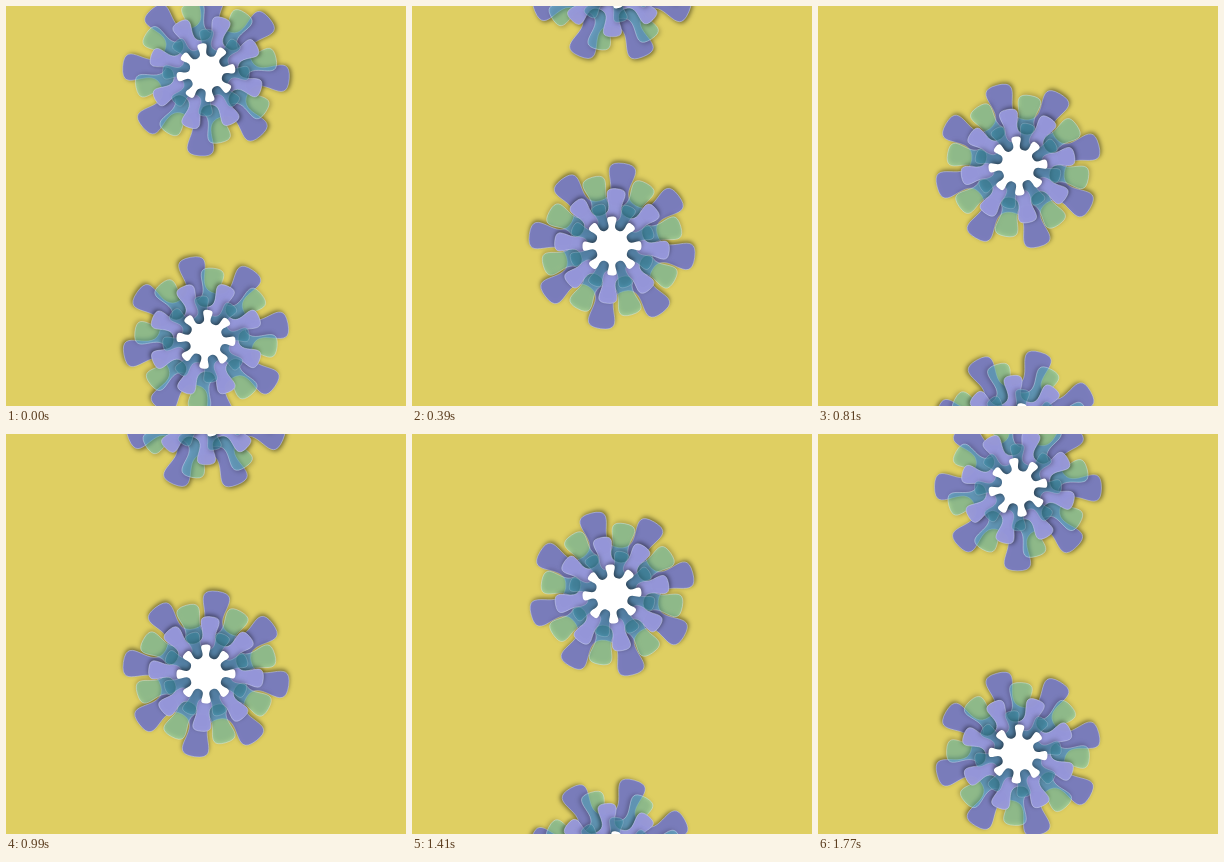
Write an HTML page that moves like this. It is 400 px wide and 400 px high and loops after 1.8 s.

```html
<!DOCTYPE html>
<html lang="en">
<head>
<meta charset="utf-8">
<title>Falling flowers</title>
<style>
  html, body { margin: 0; width: 100%; height: 100%; overflow: hidden; background: #dfcf62; }
  svg { display: block; width: 100vw; height: 100vh; }
</style>
</head>
<body>
<svg id="stage" viewBox="0 0 400 400"></svg>
<script>
const NS = "http://www.w3.org/2000/svg";
const stage = document.getElementById("stage");
const PERIOD = 600, STEP = 30, SPACING = 800 / 3, TOP = 200 / 3;

// start: degrees at time zero; turn: degrees per period
const RINGS = [
  { radius: 83.5, start: 4.2, turn: 75, fill: "#797cbf", alpha: 0.97, edge: 0.45 },
  { radius: 71.5, start: 33.3, turn: 62.5, fill: "#5fd6dc", alpha: 0.42, edge: 0.45 },
  { radius: 57.5, start: 17, turn: 50, fill: "#989add", alpha: 0.96, edge: 0.45 },
  { radius: 43.5, start: 0.8, turn: 37.5, fill: "#3f8fa8", alpha: 0.55, edge: 0.25 },
  { radius: 29.5, start: 36.6, turn: 12.5, fill: "#fff", alpha: 1, edge: 0 }
];
// The shadow swings anticlockwise around each flower, measured from straight up
const SHADOW = { distance: 2, start: 85, turn: -130 };

function add(parent, tag, attrs = {}) {
  const el = document.createElementNS(NS, tag);
  for (const key in attrs) el.setAttribute(key, attrs[key]);
  parent.appendChild(el);
  return el;
}

// Eight-armed star with broad rounded tips and soft valleys
function starPath(radius, arms = 8) {
  const inner = radius * 0.56, tipHandle = radius * 0.38, valleyHandle = radius * 0.32;
  const point = (angle, r, side) =>
    [r * Math.sin(angle) + side * Math.cos(angle),
     -r * Math.cos(angle) + side * Math.sin(angle)].map(v => v.toFixed(2)).join(",");
  let d = "M" + point(0, radius, 0);
  for (let i = 0; i < arms; i++) {
    const tip = i * 2 * Math.PI / arms;
    const valley = tip + Math.PI / arms;
    const next = tip + 2 * Math.PI / arms;
    d += `C${point(tip, radius, tipHandle)} ${point(valley, inner, -valleyHandle)} ${point(valley, inner, 0)}`;
    d += `C${point(valley, inner, valleyHandle)} ${point(next, radius, -tipHandle)} ${point(next, radius, 0)}`;
  }
  return d + "Z";
}

function makeFlower(offset, index) {
  const id = "shadow" + index;
  const group = add(stage, "g");
  const filter = add(group, "filter", {
    id, filterUnits: "userSpaceOnUse", x: -105, y: -105, width: 210, height: 210,
    "color-interpolation-filters": "sRGB"
  });
  const shadow = add(filter, "feDropShadow", {
    stdDeviation: 2.2, "flood-color": "#000", "flood-opacity": 0.5
  });
  const petals = RINGS.map(ring => {
    const layer = add(group, "g", { filter: `url(#${id})` });
    return add(layer, "path", {
      d: starPath(ring.radius), fill: ring.fill, "fill-opacity": ring.alpha,
      stroke: "#e4eeff", "stroke-opacity": ring.edge, "stroke-width": 0.8
    });
  });
  return { offset, group, shadow, petals };
}

const flowers = [-1, 0, 1].map(makeFlower);

function draw(ms) {
  const phase = Math.floor(ms / STEP) * STEP % PERIOD / PERIOD;
  for (const { offset, group, shadow, petals } of flowers) {
    const age = phase + offset;
    const direction = (SHADOW.start + SHADOW.turn * age) * Math.PI / 180;
    shadow.setAttribute("dx", SHADOW.distance * Math.sin(direction));
    shadow.setAttribute("dy", -SHADOW.distance * Math.cos(direction));
    group.setAttribute("transform", `translate(200 ${TOP + SPACING * age})`);
    petals.forEach((petal, i) =>
      petal.setAttribute("transform", `rotate(${RINGS[i].start + RINGS[i].turn * age})`));
  }
}

let begin;
function tick(now) {
  begin ??= now;
  draw(now - begin);
  requestAnimationFrame(tick);
}
draw(0);
requestAnimationFrame(tick);
</script>
</body>
</html>
```
